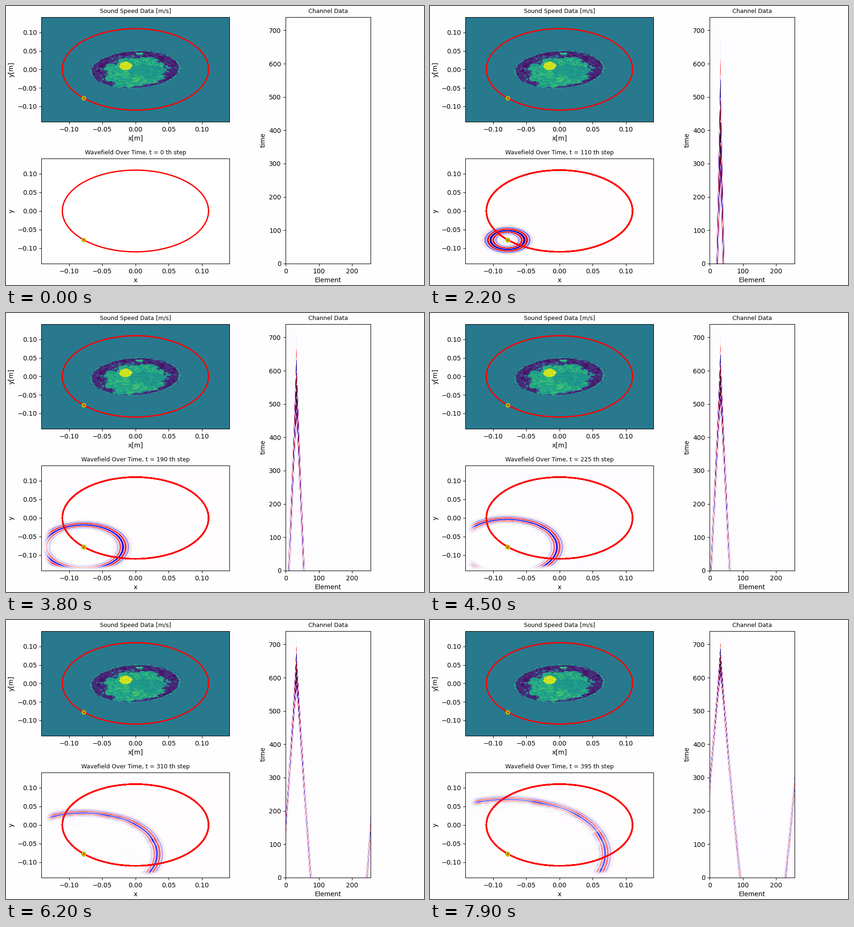
A matplotlib script that plays this animation: 900 px wide and 600 px high, repeating every 8000 ms.

```python
import numpy as np
import matplotlib.pyplot as plt
from matplotlib.animation import FuncAnimation

FRAMES, STEP = 80, 5
N, DX = 283, 0.001          # grid cells per side, cell size in m
HALF = N * DX / 2
ELEMENTS, SOURCE, RADIUS = 256, 32, 0.11
SPAN = 740                  # height of the channel plot
PERIOD, WIDTH, DELAY = 19, 12.5, 48   # source pulse, in steps
EDGE = 20                   # absorbing border, in cells

axis = (np.arange(N) - N // 2) * DX
X, Y = np.meshgrid(axis, axis)
rng = np.random.default_rng(7)


def noise(size):
    """Unit-variance random field with features about `size` cells wide."""
    k = np.fft.fftfreq(N) * 2 * np.pi
    soft = np.exp(-(k[:, None] ** 2 + k[None, :] ** 2) * size ** 2 / 2)
    field = np.fft.ifft2(np.fft.fft2(rng.standard_normal((N, N))) * soft).real
    return field / field.std()


def ellipse(cx, cy, rx, ry, shear=0.0):
    return np.hypot((X - cx) / rx, (Y - cy - shear * X) / ry)


def phantom():
    """Relative sound speed, 0 to 1."""
    fine, mid, coarse = noise(0.6), noise(1.6), noise(4)
    body = ellipse(0, -0.0003, 0.0693, 0.0525, 0.072)
    gland = ellipse(0, -0.007, 0.046, 0.040, 0.04) + 0.09 * coarse + 0.07 * mid
    core = ellipse(0.018, -0.004, 0.026, 0.018) + 0.15 * coarse
    v = np.full((N, N), 0.405)
    fat = 0.11 + 0.04 * fine + 0.03 * mid
    fat = np.where(mid + 0.4 * coarse > 1.6, 0.36 + 0.05 * fine, fat)
    tissue = 0.61 + 0.045 * fine + 0.035 * mid
    tissue = np.where(core < 1, 0.53 + 0.03 * fine + 0.02 * mid, tissue)
    inside = np.where(gland < 1, tissue, fat)
    inside = np.where(ellipse(0.006, 0.043, 0.006, 0.003) < 1, 0.68, inside)
    v = np.where(body < 1, 0.53 + 0.08 * fine, v)
    v = np.where((body > 0.985) & (body < 1.01) & (fine > 0.2), 0.2, v)
    v = np.where(body < 0.95 + 0.01 * mid, inside, v)
    tumour = ellipse(-0.0145, 0.0095, 0.0095, 0.011) + 0.04 * mid
    v = np.where(tumour < 1, 0.93 + 0.03 * fine, v)
    return np.clip(v, 0.02, 1)


def cell(pos):
    return np.rint(pos / DX).astype(int) + N // 2


def simulate(speed):
    """Acoustic wave from one element; returns snapshots and element records."""
    courant2 = (0.425 * speed / 1480) ** 2
    border = np.minimum(np.arange(N), np.arange(N)[::-1])
    depth = np.clip(EDGE - border, 0, EDGE) / EDGE
    damp = np.exp(-0.3 * depth ** 2)
    sponge = damp[:, None] * damp[None, :]
    old, now, lap = (np.zeros((N, N)) for _ in range(3))
    snaps, record = [], []
    m = slice(2, -2)
    for t in range(FRAMES * STEP):
        if t % STEP == 0:
            snaps.append(now.astype(np.float32))
        record.append(now[rows, cols])
        lap[m, m] = (
            16 * (now[1:-3, m] + now[3:-1, m] + now[m, 1:-3] + now[m, 3:-1])
            - (now[:-4, m] + now[4:, m] + now[m, :-4] + now[m, 4:])
            - 60 * now[m, m]) / 12
        new = 2 * now - old + courant2 * lap
        lag = t - DELAY
        new[rows[SOURCE], cols[SOURCE]] -= (
            np.cos(2 * np.pi * lag / PERIOD) * np.exp(-lag ** 2 / (2 * WIDTH ** 2)))
        old, now = now * sponge, new * sponge
    return snaps, np.array(record)


angle = np.pi + 2 * np.pi * np.arange(ELEMENTS) / ELEMENTS
ex, ey = RADIUS * np.cos(angle), RADIUS * np.sin(angle)
rows, cols = cell(ey), cell(ex)

relative = phantom()
snaps, record = simulate(1440 + 100 * relative)
peak = np.abs(snaps[30]).max() / 0.68

fig = plt.figure(figsize=(9, 6), dpi=100, facecolor="#fefefe")


def panel(x0, y0, x1, y1, title, xlabel, ylabel):
    """Axes placed by stage pixels, measured from the top left."""
    ax = fig.add_axes([x0 / 900, 1 - y1 / 600, (x1 - x0) / 900, (y1 - y0) / 600])
    ax.set_xlabel(xlabel)
    ax.set_ylabel(ylabel)
    return ax, ax.set_title(title, fontsize=9)


def picture(ax, data, extent, **style):
    return ax.imshow(data, extent=extent, aspect="auto", **style)


def ring(ax):
    a = np.linspace(0, 2 * np.pi, 257)
    line, = ax.plot(RADIUS * np.cos(a), RADIUS * np.sin(a), "r", lw=2, zorder=3)
    mark, = ax.plot(ex[SOURCE], ey[SOURCE], "yo", ms=5, mew=2,
                    mfc="none", zorder=4)
    return line, mark


box = [-HALF, HALF, -HALF, HALF]
waves = dict(cmap="seismic", vmin=-peak, vmax=peak)

ax_speed, _ = panel(76.2, 23.8, 481.2, 248.8, "Sound Speed Data [m/s]", "x[m]", "y[m]")
picture(ax_speed, relative, box, cmap="viridis", vmin=0, vmax=1, origin="lower")
ring(ax_speed)

ax_wave, wave_title = panel(76.2, 327.8, 481.2, 553.8, "", "x", "y")
wave = picture(ax_wave, snaps[0], box, origin="lower", **waves)
# Overlaid copies make the outline grow bolder during the first steps.
rings = [ring(ax_wave) for _ in range(20)]

ax_chan, _ = panel(602.1, 23.8, 785.1, 553.8, "Channel Data", "Element", "time")
channel = picture(ax_chan, record[:1], [0, ELEMENTS, 0, SPAN], **waves)

for ax in (ax_speed, ax_wave):
    ax.set_xlim(-HALF, HALF)
    ax.set_ylim(-HALF, HALF)
    ax.set_xticks([-0.10, -0.05, 0, 0.05, 0.10])
    ax.set_yticks([-0.10, -0.05, 0, 0.05, 0.10])
ax_chan.set_xticks(range(0, 201, 100))
ax_chan.set_yticks(range(0, 701, 100))


def update(n):
    t = n * STEP
    wave_title.set_text(f"Wavefield Over Time, t = {t} th step")
    wave.set_data(snaps[n])
    channel.set_data(record[:max(t, 1)])
    for im in (wave, channel):
        im.set_visible(n > 0)
    for i, pair in enumerate(rings):
        for artist in pair:
            artist.set_visible(i <= n)
    return wave, channel, wave_title


anim = FuncAnimation(fig, update, frames=FRAMES, interval=100,
                     repeat=True, repeat_delay=0, blit=False)
plt.show()
```
